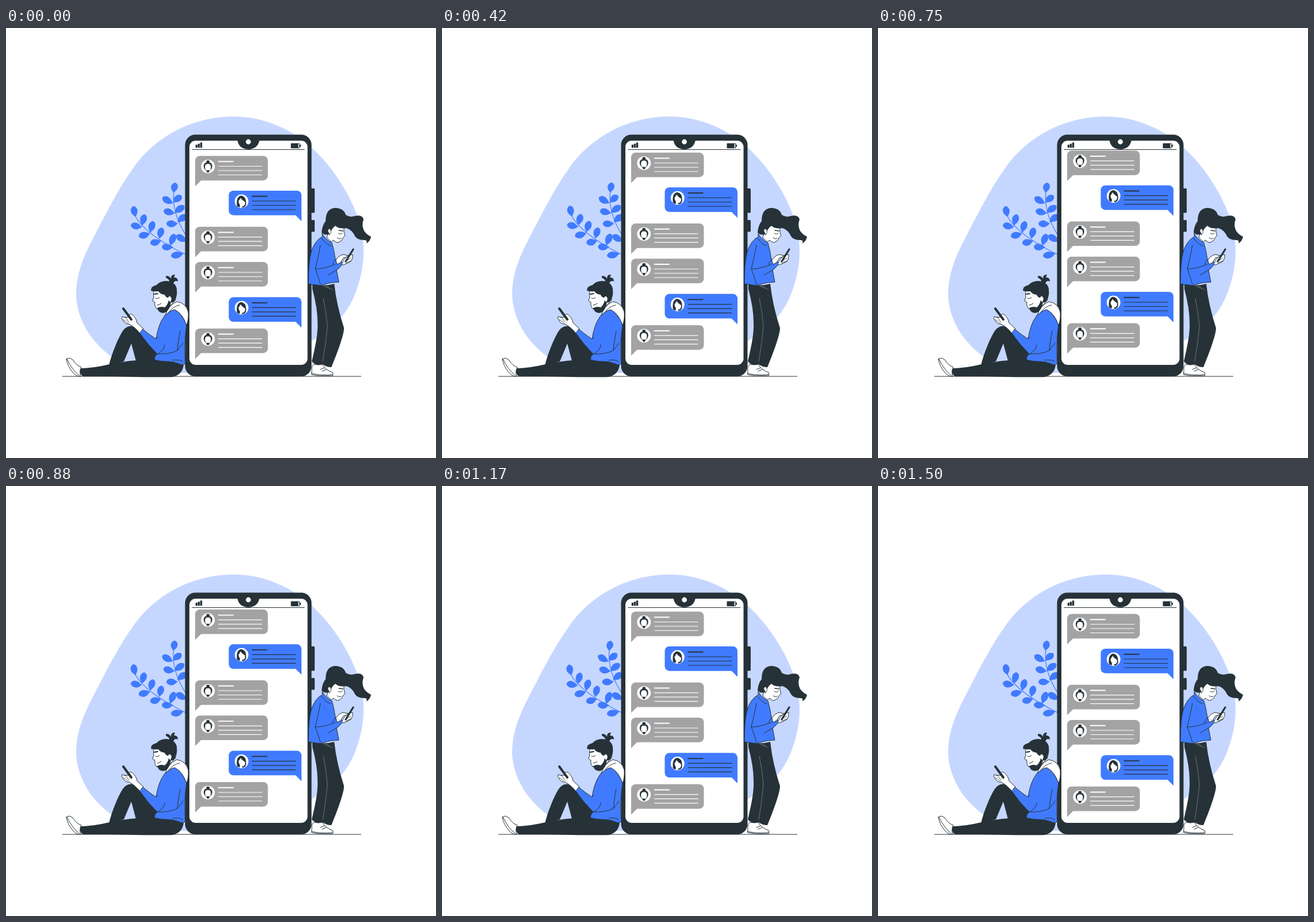
Recreate the animation shown at these times as an HTML page with a canvas. Size 748 by 748 pixels, loop 1.54 s.

```html
<!DOCTYPE html>
<html lang="en">
<head>
<meta charset="utf-8">
<title>Chat</title>
<style>
html, body { margin: 0; width: 100%; height: 100%; overflow: hidden; background: #fff; }
canvas { display: block; width: 748px; height: 748px; }
</style>
</head>
<body>
<canvas id="stage"></canvas>
<script>
const BLUE = '#407bff', DARK = '#263238', PALE = '#c6d7ff', GRAY = '#a3a3a3', WHITE = '#fff';
const LOOP = 1540, STEP = 1000 / 24, SIZE = 748;
const canvas = document.getElementById('stage');
const ctx = canvas.getContext('2d');
const ratio = window.devicePixelRatio || 1;
canvas.width = canvas.height = SIZE * ratio;

function shape(d, fill, stroke, width = 1) {
  const path = new Path2D(d);
  if (fill) { ctx.fillStyle = fill; ctx.fill(path); }
  if (stroke) { ctx.strokeStyle = stroke; ctx.lineWidth = width; ctx.stroke(path); }
}
const line = (d, color = DARK, width = 1) => shape(d, null, color, width);

function box(x, y, w, h, r, fill) {
  ctx.beginPath();
  ctx.roundRect(x, y, w, h, r);
  ctx.fillStyle = fill;
  ctx.fill();
}

function oval(x, y, rx, ry, fill) {
  ctx.beginPath();
  ctx.ellipse(x, y, rx, ry, 0, 0, Math.PI * 2);
  ctx.fillStyle = fill;
  ctx.fill();
}

function backdrop() {
  shape('M397 154C448 154 500 177 534 210C576 250 606 303 617 346C627 387 622 428 605 468C589 505 560 530 520 551C450 585 380 600 310 600L250 599C218 597 182 575 160 551C134 524 122 490 122 462C123 418 141 387 156 357C177 317 197 277 221 244C255 195 317 154 397 154Z', PALE);
  line('M98.5 606H617.5', DARK, 1.2);
}

function leaf(x, y, tipX, tipY) {
  const length = Math.hypot(tipX - x, tipY - y);
  ctx.save();
  ctx.translate(x, y);
  ctx.rotate(Math.atan2(tipY - y, tipX - x));
  ctx.scale(length / 20, 1);
  shape('M0 0C3 -2 6 -6 11 -6C16 -6 19 -3 20 0C19 4 16 6 11 5.7C6 5 3 1 0 0Z', BLUE);
  ctx.restore();
}

function plant(angle) {
  ctx.save();
  ctx.translate(315, 400);
  ctx.rotate(angle);
  ctx.translate(-315, -400);
  line('M292 284Q287 322 316 365M224 326Q241 359 316 396', BLUE, 1.2);
  [[292, 287, 294, 269], [291, 305, 272, 295], [291, 304, 305, 291],
   [294, 322, 274, 318], [293, 322, 310, 309], [299, 340, 279, 341],
   [298, 338, 314, 325], [315, 371, 296, 361],
   [226, 329, 221, 310], [237, 344, 241, 324], [237, 346, 217, 343],
   [251, 356, 256, 336], [251, 357, 231, 363], [267, 367, 271, 347],
   [270, 370, 251, 375], [286, 379, 293, 358], [291, 381, 271, 381],
   [309, 392, 287, 397]].forEach(p => leaf(...p));
  ctx.restore();
}

function phone() {
  box(529, 279, 8, 42.5, 1.5, DARK);
  box(529, 334, 8, 20.5, 1.5, DARK);
  box(311.5, 185.5, 220, 420.5, 18, DARK);
  box(319, 196, 205.5, 390, 11, WHITE);
  shape('M402.5 195C404 206 412 211 421.7 211C431 211 439 206 441 195Z', DARK);
  oval(421.6, 198, 4.4, 4.4, WHITE);
  line('M324 211.5H519', DARK, 1.2);
  box(329.8, 203, 3.4, 5.2, .5, DARK);
  box(333.8, 201.3, 3.4, 6.9, .5, DARK);
  box(337.8, 199.2, 3.4, 9, .5, DARK);
  box(495.5, 200.5, 15.5, 8.7, 1, DARK);
  box(508.5, 201.5, 1.6, 6.7, 0, WHITE);
  box(511, 202.7, 2, 4, .5, DARK);
}

function manAvatar() {
  oval(0, -8.4, 2.9, 2.3, DARK);
  shape('M-6 5L-7.5 0Q-7.5 -6 -3 -7H3Q7.5 -6 7.5 0L6 5L5 2Q5.5 -2 3.5 -4Q0 -5.5 -3.5 -4Q-5.5 -2 -5 2Z', DARK);
  line('M-5.5 3Q-5 6 -2 8M5.5 3Q5 6 2 8', DARK, .9);
  shape('M-2.7 6.8Q0 6 2.7 6.8L1.8 9.8Q0 11 -1.8 9.8Z', DARK);
}

function womanAvatar() {
  shape('M-8 8Q-10 -8 -1 -10Q8 -9 8 3Q8 8 5 10Q0 12 -4 10Q-7 10 -8 8Z', DARK);
  shape('M-2 -6Q1 -2 6 1Q7 5 4 8Q2 9 1 8L1 11H-3V6Q-6 2 -5 -1Q-3 -3 -2 -6Z', WHITE);
}

function message(top, sent) {
  const x = sent ? 387.5 : 329, color = sent ? BLUE : GRAY, ink = sent ? DARK : WHITE;
  const textX = x + 40.7;
  box(x, top, 126.5, 42.7, 8, color);
  shape(sent ? `M514 ${top + 33}V${top + 53}L503 ${top + 42}Z`
             : `M329 ${top + 33}V${top + 53}L340 ${top + 42}Z`, color);
  oval(x + 22.3, top + 18.4, 11.9, 11.9, WHITE);
  ctx.save();
  ctx.translate(x + 22.3, top + 18.4);
  (sent ? womanAvatar : manAvatar)();
  ctx.restore();
  line(`M${textX} ${top + 9.8}h25.5`, ink, 1.9);
  for (let i = 0; i < 3; i++) line(`M${textX} ${top + 18 + i * 7.5}h75.5`, ink, 1.2);
}

function man() {
  // legs and shoe
  shape('M179 587C185 563 195 540 203 527Q209 518 219 518.5Q226 520 231 527L264 568L258 580L226 579L218 549L205 580Z', DARK);
  shape('M129 592Q150 592 180 585Q220 576 260 577Q295 577 309 586Q307 603 290 607Q260 608 180 606L134 606Q127 602 129 592Z', DARK);
  shape('M105 576Q109 572 116 577Q123 588 131 590Q127 597 130 606Q123 607 116 599Q107 588 105 576Z', WHITE, DARK);
  line('M106 576Q115 595 128 605');

  // hand and handset
  shape('M213 503Q214 496 219 498Q227 505 228 513L239 523L234 532Q224 520 214 515Q206 515 204 509Q200 506 202 502Q207 505 213 503Z', WHITE, DARK);
  line('M204 488L218 507', DARK, 4);
  line('M207 502L214 512M204 507L212 513', DARK, .8);

  // sweater
  shape('M238 524Q250 534 261 541Q265 515 275 502Q281 493 294 489Q309 501 314 517Q309 552 312 584L306 586Q290 579 275 580Q264 579 258 577Q258 571 263 567Q245 549 233 531Z', BLUE, DARK);
  line('M261 541L264 538M303 527Q299 548 298 561Q285 568 262 567M298 561L308 548M276 551Q277 559 264 567M290 578Q300 576 307 580');

  // hood, face and beard
  shape('M277 500Q282 483 297 476Q313 478 317 494Q318 508 314 517Q308 498 294 490Q285 491 277 500Z', WHITE, DARK);
  line('M283 495Q290 484 302 482');
  shape('M257 457Q256 464 257 468L255 474Q256 477 259 477Q258 484 262 488L276 492L283 486L295 473L294 453Z', WHITE, DARK);
  shape('M262 488Q268 483 276 486Q281 482 283 474L287 475Q286 487 279 494Q272 498 266 493Q265 490 262 488Z', DARK);
  shape('M252 457Q252 449 262 447Q268 440 279 440Q294 441 297 453Q299 469 291 477L285 478Q283 474 284 469Q278 470 276 464Q268 463 265 458Q258 459 252 457Z', DARK);
  shape('M283 443Q286 438 279 435Q276 432 280 431Q285 432 287 436Q287 428 294 429L292 434Q299 433 299 441Q294 438 291 444Z', DARK);
  shape('M283 472Q281 466 286 467Q290 472 285 477Z', WHITE);
  line('M258 463L264 462', DARK, 1.8);
  line('M260 470Q263 472 267 469M263 482Q267 482 270 479');
}

function woman() {
  // legs and shoes
  shape('M533 445Q552 450 571 445Q575 482 588 522Q588 533 574 570L566 590Q557 590 551 585L545 586Q538 587 532 580C538 554 543 532 542 512Q542 488 533 454Z', DARK);
  line('M552 470Q557 493 559 518Q557 545 551 580M553 449L568 455M555 446L563 453', '#7d858a', .8);
  shape('M532 594Q531 588 536 585Q544 587 550 585Q556 595 568 599Q570 603 568 605H546L532 603Z', WHITE, DARK);
  line('M532 601Q548 605 568 603M547 594L554 591M550 597L557 594');

  // sweater
  shape('M550 358Q557 369 567 374Q571 387 573 403L579 400L586 410Q578 420 575 421L579 442L566 443Q555 445 547 448L526 445Q526 408 531 389Q537 370 550 363Z', BLUE, DARK);
  line('M547 378Q543 400 538 419Q551 420 573 411M538 419Q542 429 547 446M549 366Q556 376 565 379M573 403L568 411M575 421L560 430');

  // hands and handset
  shape('M584 411Q587 402 596 395L603 394Q604 401 600 406Q593 410 587 412Z', WHITE, DARK);
  line('M604 385L591 406', DARK, 3.2);
  shape('M574 403Q580 395 587 394L595 396Q592 399 587 400L582 408L576 411Z', WHITE, DARK);
  line('M589 407L600 400M591 409L600 405', DARK, .8);

  // head
  shape('M558 349Q561 358 558 365L566 372L570 369Q575 375 580 372Q586 369 586 365L590 361Q587 356 588 346L574 338Z', WHITE, DARK);
  shape('M549 356Q550 343 556 336Q556 313 574 313Q588 314 591 325Q598 330 607 327Q620 324 622 333Q618 343 623 353Q627 359 635 363Q634 370 627 375Q629 368 623 369Q611 369 607 362Q602 351 592 348Q579 350 573 344Q566 349 564 358Q555 362 549 356Z', DARK);
  shape('M562 357Q557 351 563 349Q568 354 563 360Z', WHITE, DARK, .8);
  line('M578 357Q581 360 585 357M576 365Q579 368 583 366');
  line('M579 352L586 353', DARK, 1.5);
}

function draw(time) {
  const t = Math.floor((time % LOOP + 5) / STEP) * STEP;
  const turn = 710, end = 1480, rise = 9.8;
  const shift = -rise * Math.max(0, t < turn ? t / turn : (end - t) / (end - turn));
  ctx.setTransform(ratio, 0, 0, ratio, 0, 0);
  ctx.fillStyle = WHITE;
  ctx.fillRect(0, 0, SIZE, SIZE);
  ctx.lineJoin = ctx.lineCap = 'round';
  backdrop();
  plant(.008 * Math.sin(t / LOOP * Math.PI * 2));
  phone();
  [[222.5], [283, true], [345.7], [407], [468.3, true], [522.7]]
    .forEach(([top, sent]) => message(top + shift, sent));
  man();
  woman();
}

const start = performance.now();
function tick() {
  draw(performance.now() - start);
  requestAnimationFrame(tick);
}
tick();
</script>
</body>
</html>
```
